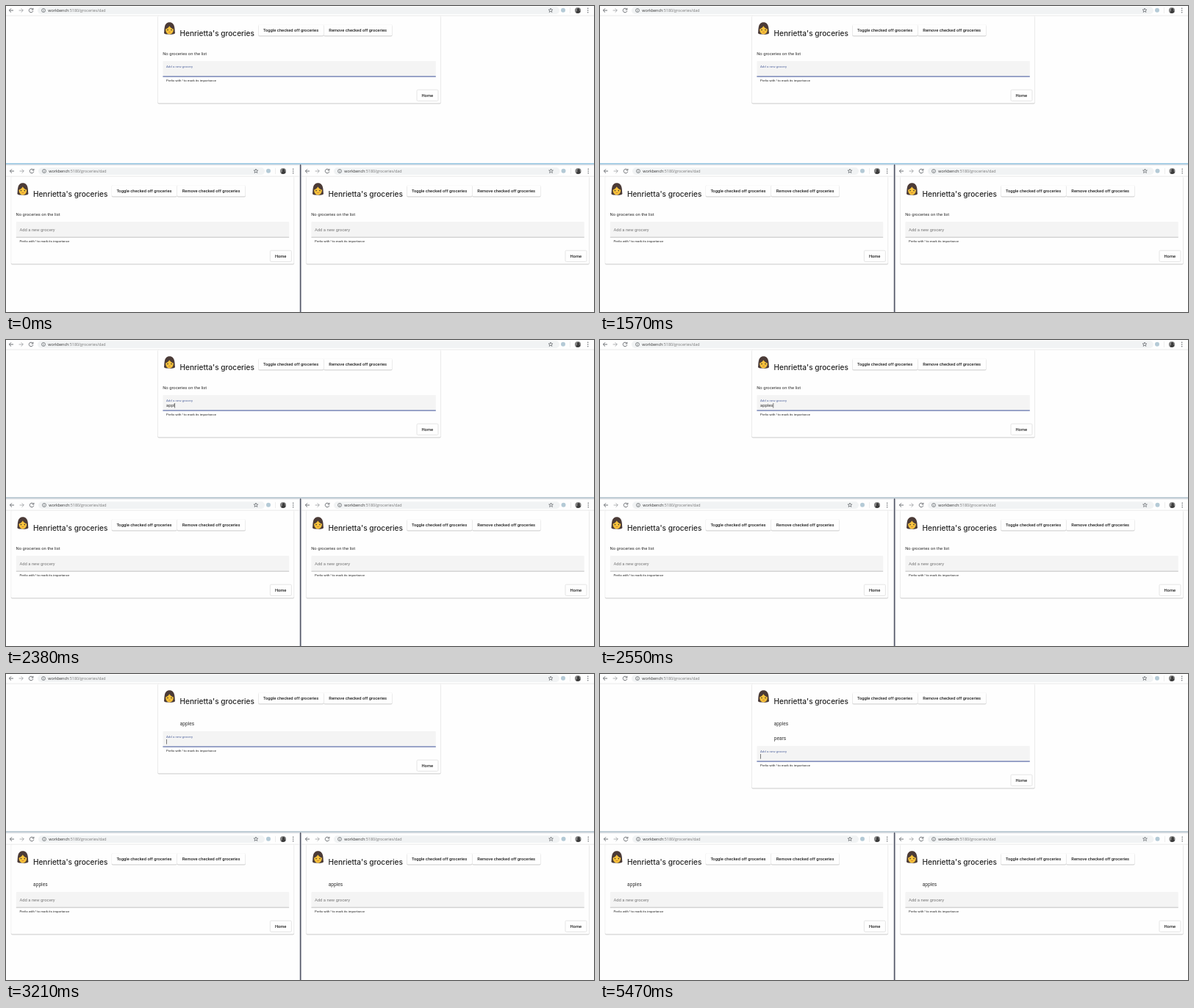
An HTML page that plays this animation: 800x417 px, repeating every 8 s.

```html
<!DOCTYPE html>
<html lang="en">
<head>
<meta charset="utf-8">
<title>Shared grocery list</title>
<style>
html, body { margin: 0; height: 100%; overflow: hidden; background: #fefefe; }
svg { display: block; width: 100vw; height: 100vh; }
text { font: 5.85px Roboto, sans-serif; fill: #333; white-space: pre; }
.url { font: 5.4px "Open Sans", sans-serif; fill: #777; }
.host { fill: #333; }
.title { font: 500 10.1px Inter, sans-serif; fill: #222; }
.button { font-weight: 500; font-size: 5.8px; fill: #222; }
.item { font-size: 6.6px; }
.hint { font-size: 4.4px; fill: #222; }
.label { font-size: 4.4px; fill: #52659f; }
.holder { fill: #777; }
.icon { fill: none; stroke: #5f6368; stroke-width: .9; }
</style>
</head>
<body>
<svg id="stage" viewBox="0 0 800 417"></svg>
<script>
const LOOP = 8000;
const stage = document.getElementById('stage');

// start, typed text, caret shown, items in the top / left / right window
const steps = [
  [0, '', 0, 0, 0, 0],
  [20, '', 1, 0, 0, 0],
  [520, '', 0, 0, 0, 0],
  [1080, '', 1, 0, 0, 0],
  [1570, '', 0, 0, 0, 0],
  [2100, 'a', 1, 0, 0, 0],
  [2200, 'app', 1, 0, 0, 0],
  [2380, 'appl', 1, 0, 0, 0],
  [2430, 'apple', 1, 0, 0, 0],
  [2550, 'apples', 1, 0, 0, 0],
  [3120, 'apples', 1, 0, 1, 0],
  [3210, '', 1, 1, 1, 1],
  [3880, 'pea', 1, 1, 1, 1],
  [5470, '', 1, 2, 1, 1]
];
const groceries = ['apples', 'pears'];

const rect = (x, y, w, h, fill, extra = '') =>
  `<rect x="${x}" y="${y}" width="${w}" height="${h}" fill="${fill}" ${extra}/>`;
const text = (x, y, str, cls = '') => `<text x="${x}" y="${y}" class="${cls}">${str}</text>`;
const path = (d, extra = 'class="icon"') => `<path d="${d}" ${extra}/>`;
const circle = (x, y, r, fill) => `<circle cx="${x}" cy="${y}" r="${r}" fill="${fill}"/>`;
const group = (x, y, content) => `<g transform="translate(${x} ${y})">${content}</g>`;

// White box with a soft lower edge
const raised = (x, y, w, h) =>
  rect(x - .5, y, w + 1, h + 1, '#ececec', 'rx="1.5"') +
  rect(x, y + 1, w, h - .3, '#c4c4c4', 'rx="1.5"') +
  rect(x, y, w, h, '#fefefe', 'rx="1.5"');

function toolbar(left, right) {
  return rect(left + 44, 1.2, right + 709 - left, 9.8, '#f1f3f4', 'rx="4.9"') +
    group(left, 0,
      path('M11 6H5.5M8 3.3L5.3 6L8 8.7') +
      path('M18.6 6H24.2M21.6 3.3L24.3 6L21.6 8.7', 'class="icon" opacity=".55"') +
      path('M37.3 4.3A2.8 2.8 0 1 0 37.8 6.6M37.9 2.8V5H35.6') +
      '<circle cx="52" cy="6" r="2.5" class="icon" style="stroke-width:.7"/>' +
      path('M52 5.6V7.6M52 4.3V5', 'class="icon" style="stroke-width:.7"') +
      text(58.3, 7.9, '<tspan class="host">workbench</tspan>:5180/groceries/dad', 'url')) +
    group(right, 0,
      path('M741 3L741.8 5H743.9L742.3 6.3L742.9 8.5L741 7.2L739.1 8.5L739.7 6.3L738.1 5H740.2Z',
        'class="icon" style="stroke-width:.7"') +
      circle(758, 5.7, 3, '#b4cad6') +
      rect(767.5, 2, .5, 8, '#ddd') +
      circle(778, 6, 4.1, '#858585') +
      path('M775.5 9.2Q775.7 6.5 777.4 6.2A1.8 1.8 0 1 1 780 6Q781.7 6.8 781.2 8.6Q778.6 11 775.5 9.2Z', 'fill="#3b3b3b"') +
      [3.2, 6, 8.8].map(y => circle(791.7, y, .75, '#5f6368')).join(''));
}

const face =
  path('M215 37C215.5 34 215.2 31 216 28C217 24 219.5 22.3 222.5 22.3S228 24 229 28C229.8 31 229.5 34 230 37C229 39 225 38.8 222.5 38.5S216 39 215 37Z', 'fill="#4b3b37"') +
  path('M217.2 31.5C219.5 30.8 221.5 29 222.3 27.2C223.6 29.4 225.8 31 227.8 31.5C228 36 225.3 38.4 222.5 38.4S217 36 217.2 31.5Z', 'fill="#f8c33c"') +
  circle(220, 32.6, .8, '#333') + circle(225, 32.6, .8, '#333') +
  path('M220.7 35.4Q222.5 36.8 224.3 35.4Z', 'fill="#a5432f"');

function field(active, typed, caret) {
  const content = active
    ? text(218, 83.5, 'Add a new grocery', 'label') +
      `<text x="218" y="91" id="typed">${typed}</text>` +
      (caret ? rect(218, 86, .7, 6.6, '#444', 'id="caret"') : '')
    : text(218, 88, 'Add a new grocery', 'holder');
  return rect(213.4, 75, 371.4, 21, '#f4f4f4', 'rx="1"') +
    rect(213.4, active ? 95.5 : 95.8, 371.4, active ? 1.2 : .6, active ? '#5b6ca8' : '#999') +
    content +
    text(218, 102.8, 'Prefix with ! to mark its importance', 'hint');
}

function card(count, active, typed, caret) {
  const shift = count ? 20 * count - 17 : 0;
  const list = count
    ? groceries.slice(0, count).map((name, i) => text(236.7, 70 + 20 * i, name, 'item')).join('')
    : text(213.2, 66.8, 'No groceries on the list');
  return raised(206.7, 13, 384.6, 119.5 + shift) +
    face +
    text(236.5, 41, "Henrietta's groceries", 'title') +
    raised(343.6, 25.2, 88.4, 15.3) + text(350, 35, 'Toggle checked off groceries', 'button') +
    raised(432.6, 25.2, 92.6, 15.3) + text(439.3, 35, 'Remove checked off groceries', 'button') +
    list +
    group(0, shift, field(active, typed, caret) +
      rect(559, 114.2, 29, 15.2, '#fefefe', 'rx="1.5" stroke="#dcdcdc" stroke-width=".7"') +
      text(565.5, 123.6, 'Home', 'button'));
}

function render([start, typed, caret, top, left, right]) {
  const edge = start < 2100 ? '#8cc0de' : '#adbfca';
  stage.innerHTML =
    card(top, true, typed, caret) +
    rect(0, 0, 800, 12.8, '#fefefe') + rect(0, 12.8, 800, .6, '#dcdcdc') + toolbar(-1, 0) +
    group(-199.6, 219, card(left)) +
    group(202, 219, card(right)) +
    rect(0, 214, 800, 18, '#fefefe') + rect(0, 231.8, 800, .6, '#dcdcdc') +
    rect(0, 214.2, 800, 1.6, edge) + rect(0, 215.8, 800, 1.4, '#dee1e6') +
    group(0, 219, toolbar(0, -401) + toolbar(402, .5)) +
    rect(399, 216, 3.4, 201, '#dcdde2') + rect(400, 216, 1.3, 201, '#4c5060');
  const bar = document.getElementById('caret');
  if (bar && typed) {
    bar.setAttribute('x', 218.2 + document.getElementById('typed').getComputedTextLength());
  }
}

let shown;
function tick() {
  const time = performance.now() % LOOP;
  const step = steps.findLast(s => s[0] <= time);
  if (step !== shown) render(shown = step);
  requestAnimationFrame(tick);
}
tick();
</script>
</body>
</html>
```
